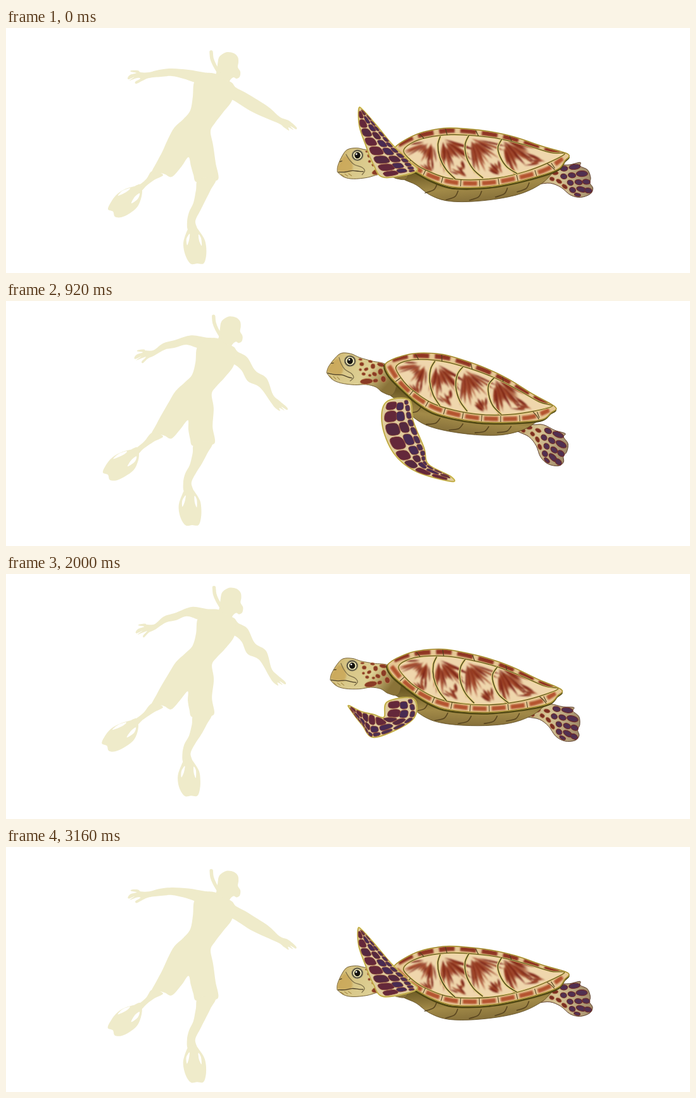
An HTML page for the animation above (3200 ms loop, 1080 px wide and 387 px high).

```html
<!DOCTYPE html>
<html lang="en">
<head>
<meta charset="utf-8">
<title>Diver and turtle</title>
<style>
html, body { margin: 0; width: 100%; height: 100%; overflow: hidden; background: #fff; }
svg { display: block; width: 100vw; height: 100vh; }
</style>
</head>
<body>
<svg id="stage" viewBox="0 0 1080 387">
  <defs>
    <filter id="soft" x="-10%" y="-10%" width="120%" height="120%"><feGaussianBlur stdDeviation="1"/></filter>
    <linearGradient id="belly" x1="0" y1="0" x2="0" y2="1">
      <stop offset="0.35" stop-color="#6f5c26"/><stop offset="0.72" stop-color="#a28a48"/><stop offset="1" stop-color="#86703a"/>
    </linearGradient>
    <linearGradient id="head" x1="0" y1="0" x2="1" y2="0.35">
      <stop offset="0" stop-color="#c5a557"/><stop offset="0.22" stop-color="#d6c382"/>
      <stop offset="0.65" stop-color="#ddcf94"/><stop offset="1" stop-color="#8a7338"/>
    </linearGradient>
    <linearGradient id="hind" x1="0" y1="0" x2="1" y2="0">
      <stop offset="0" stop-color="#a9905a"/><stop offset="0.5" stop-color="#d8c596"/><stop offset="1" stop-color="#a08a68"/>
    </linearGradient>
    <clipPath id="plates"><path id="platesPath"/></clipPath>
    <clipPath id="shellClip"><path id="shellPath"/></clipPath>
  </defs>
  <g id="diver"></g>
  <g id="turtle"><g id="rear"></g><g id="body"></g></g>
  <g id="flipper"></g>
</svg>
<script>
const LOOP = 3200, STEP = 40;
const $ = id => document.getElementById(id);
const pts = s => s.trim().split(/\s+/).map(p => p.split(',').map(Number));
const mix = (a, b, k) => a + (b - a) * k;
const n1 = v => v.toFixed(1);

function add(parent, tag, attrs) {
  const el = document.createElementNS('http://www.w3.org/2000/svg', tag);
  for (const k in attrs) el.setAttribute(k, attrs[k]);
  return parent.appendChild(el);
}

// Smooth curve through points.
function curve(p, closed) {
  const n = p.length;
  const at = i => closed ? p[(i + n) % n] : p[Math.max(0, Math.min(n - 1, i))];
  let d = 'M' + p[0].map(n1);
  for (let i = 0; i < (closed ? n : n - 1); i++) {
    const [a, b, c, e] = [at(i - 1), at(i), at(i + 1), at(i + 2)];
    const c1 = [0, 1].map(k => n1(b[k] + (c[k] - a[k]) / 6));
    const c2 = [0, 1].map(k => n1(c[k] - (e[k] - b[k]) / 6));
    d += `C${c1} ${c2} ${c.map(n1)}`;
  }
  return d + (closed ? 'Z' : '');
}

let seed = 11;
const rnd = () => (seed = seed * 16807 % 2147483647) / 2147483647;

/* ---------- diver ---------- */
const SKIN = '#efebca';
const diverParts = [
  // head and neck
  ['334,58 336,47 342,41 350,38 360,40 366,46 367,54 366,62 370,69 369,77 364,80 359,78 353,84 350,98 332,98 326,82 332,71'],
  // far arm
  ['332,74 312,70 288,66 262,64 242,66 226,70 213,70 208,67 198,67 197,69 206,71 196,74 192,79 194,81 203,77 195,83 207,79 212,80 204,85 206,88 216,83 226,79 245,77 262,76 280,80 298,86 315,92'],
  // near arm
  ['344,84 356,86 363,94 378,102 398,114 416,126 433,141 446,146 458,156 458,160 449,155 454,161 446,157 447,162 439,157 431,151 405,140 386,131 370,121 356,113 340,110'],
  // trunk and shorts
  ['326,72 345,82 358,92 357,114 343,133 330,150 323,163 327,185 331,213 335,239 316,241 300,243 296,232 292,218 288,204 277,219 262,235 251,231 243,229 229,231 238,212 247,195 256,175 266,157 280,144 291,130 295,108 297,86 308,76'],
  // lower legs
  ['231,226 222,238 213,246 204,250 205,260 214,257 222,249 234,240 248,232'],
  ['304,239 300,256 296,276 289,291 286,306 288,320 302,320 299,305 307,288 315,272 323,256 331,238'],
  // fins
  ['212,247 203,250 189,254 176,262 167,273 161,286 169,290 172,298 182,299 195,293 207,283 213,270 215,257'],
  ['289,316 284,325 280,340 282,355 287,367 293,373 302,372 312,372 316,360 316,345 313,333 306,322 299,314'],
  // foot openings
  ['177,265 184,257 196,253 190,259', '#fff'], ['198,277 203,267 211,261 208,270', '#fff'],
  ['286,343 285,333 290,325 289,335', '#fff'], ['304,326 308,332 309,344 305,336', '#fff']
].map(([s, fill = SKIN]) => ({ p: pts(s), el: add($('diver'), 'path', { fill }) }));
const snorkel = {
  p: pts('324,38 325,48 329,58 336,70'),
  el: add($('diver'), 'path', { fill: 'none', stroke: SKIN, 'stroke-width': 5.5, 'stroke-linecap': 'round' })
};

// Warp handles: x, y and how far each one travels.
const handles = [
  [350, 60, 6, -22], [325, 40, 6, -22], [328, 100, 7, -22], [290, 75, 7, -19],
  [258, 70, 9, -4], [224, 75, 12, 12], [198, 77, 17, 17], [362, 100, 5, -22],
  [402, 127, -7, -6], [454, 157, -23, 19], [300, 165, 3, -26], [240, 226, 0, -29],
  [210, 250, -8, -25], [166, 286, -13, -25], [316, 240, -9, -23], [292, 308, -10, -29], [297, 368, -13, -29]
];
function warp([x, y], k) {
  let sw = 0, sx = 0, sy = 0;
  for (const [hx, hy, dx, dy] of handles) {
    const w = 1 / ((x - hx) ** 2 + (y - hy) ** 2 + 60) ** 2;
    sw += w; sx += w * dx; sy += w * dy;
  }
  return [x + sx / sw * k, y + sy / sw * k];
}
function drawDiver(t) {
  const s = (t + LOOP - 200) % LOOP;
  const u = s < 1200 ? s / 1200 : 1 - (s - 1200) / 2000;
  const k = (u - 0.1) / 0.8;
  for (const { p, el } of diverParts) el.setAttribute('d', curve(p.map(q => warp(q, k)), true));
  snorkel.el.setAttribute('d', curve(snorkel.p.map(q => warp(q, k)), false));
}

/* ---------- turtle ---------- */
const body = $('body'), rear = $('rear');
const shape = (g, s, attrs) => add(g, 'path', { d: curve(pts(s), true), ...attrs });
const line = (g, s, stroke, width, attrs) =>
  add(g, 'path', { d: curve(pts(s), false), fill: 'none', stroke, 'stroke-width': width, ...attrs });
const oval = (g, cx, cy, rx, ry, turn, fill, attrs) =>
  add(g, 'ellipse', { cx, cy, rx, ry, fill, transform: `rotate(${turn} ${cx} ${cy})`, ...attrs });

// rear flipper
shape(rear, '806,224 822,217 845,213 862,208 882,211 899,211 898,217 908,225 910,238 907,246 910,255 904,263 888,265 873,258 861,243 846,233 826,230',
  { fill: 'url(#hind)', stroke: '#5a3b2a', 'stroke-width': 0.9 });
for (const [x, y, a, b, r] of [[822, 223, 5, 3, 0], [834, 226, 4, 3, 20], [842, 219, 5, 3, -15], [850, 227, 4, 3, 30], [857, 219, 5, 3, 10], [860, 233, 5, 3, 45], [867, 243, 5, 3, 50]])
  oval(rear, x, y, a, b, r, '#7c2f22', { stroke: '#b07048', 'stroke-width': 0.8 });
for (const [x, y, a, b, r] of [[872, 215, 6, 4, 10], [889, 216, 9, 4, 5], [869, 227, 5, 4, 25], [882, 228, 6, 4, 20], [898, 229, 9, 4.5, 12], [877, 239, 5, 4, 35], [890, 241, 6, 4, 22], [902, 243, 6, 4, 20], [878, 251, 5, 4, 40], [892, 253, 8, 4, 28], [884, 260, 5, 2.5, 25], [902, 257, 6, 4, 25]])
  oval(rear, x, y, a, b, r, '#513050', { stroke: '#6e2c2c', 'stroke-width': 1.2 });

// belly
shape(body, '590,180 610,165 700,190 800,205 856,205 848,217 830,230 800,241 760,246 715,246 680,241 655,229 636,212 615,200',
  { fill: 'url(#belly)', stroke: '#5d4a20', 'stroke-width': 0.8 });
for (const [x, y] of [[655, 222], [687, 236], [724, 240], [765, 239], [800, 234]])
  line(body, `${x + 14},${y - 9} ${x + 8},${y} ${x - 7},${y + 4}`, '#4a3716', 1.6, { opacity: 0.8 });

// head and neck
shape(body, '514,178 516,169 524,155 533,146 548,145 562,149 582,152 606,155 625,175 622,200 606,199 594,192 578,190 560,193 538,193 524,189 515,181',
  { fill: 'url(#head)', stroke: '#6e5a30', 'stroke-width': 0.9 });
shape(body, '515,177 518,168 527,156 535,160 539,172 535,181 524,181', { fill: '#c79f4b', opacity: 0.65, filter: 'url(#soft)' });
const spot = (x, y, a, b, r) => oval(body, x, y, a, b, r, '#8a3b25', { stroke: '#bf8a55', 'stroke-width': 0.8 });
for (const s of [[578, 185, 10, 4.5, -12], [567, 159, 3.5, 3, 0], [575, 166, 3.5, 2.5, -30], [585, 160, 3.5, 4, 0], [589, 172, 4, 3, 20], [572, 174, 3, 2.4, 0], [598, 167, 4, 5, 0], [597, 156, 6, 3, 8], [566, 168, 2.2, 2, 0], [592, 182, 4, 3, -20], [604, 178, 4, 5, -20], [580, 153, 3.5, 2, 5], [564, 152, 3, 1.6, 0], [582, 175, 2.5, 2, 0]]) spot(...s);
line(body, '515,180 526,181 538,180 548,182 555,183', '#4d4028', 1.3);
line(body, '530,153 535,163 542,171 553,176 557,182 552,188', '#7d6f48', 1.3);
line(body, '519,164 523,163', '#4d4028', 1.4);
for (const x of [519, 525, 531]) line(body, `${x},184 ${x + 5},188`, '#a3853f', 1);
oval(body, 548, 156.5, 9.5, 9, 0, '#8b8463');
oval(body, 548, 156.5, 7.6, 7.2, 0, '#ece5b4', { stroke: '#38332a', 'stroke-width': 1.1 });
oval(body, 548, 156.5, 4.6, 5, 0, '#15130f');
oval(body, 546.5, 154.5, 1.4, 1.4, 0, '#fff');

// shell
const shell = '604,156 610,148 624,140 645,132 668,128 692,127 722,131 760,139 800,152 840,170 879,186 873,196 863,207 840,214 800,221 760,225 720,224 688,219 660,206 634,188 613,171';
const plates = '621,157 633,146 660,139 698,138 735,143 775,152 815,166 852,181 874,185 846,197 810,207 766,213 722,212 684,205 650,188 632,173';
$('shellPath').setAttribute('d', curve(pts(shell), true));
$('platesPath').setAttribute('d', curve(pts(plates), true));
shape(body, shell, { fill: 'none', stroke: '#4e4612', 'stroke-width': 3, transform: 'translate(-1 2)' });
shape(body, shell, { fill: '#e6c795' });

const tops = add(body, 'g', { 'clip-path': 'url(#shellClip)' });
const soft = add(tops, 'g', { filter: 'url(#soft)' });
line(soft, '614,146 640,136 670,132 700,131 740,138 790,152 840,173 866,184', '#8f3424', 8, { 'stroke-dasharray': '25 9' });
const rim = '610,156 630,179 655,197 690,212 725,218 765,219 810,214 845,206 870,192';
line(soft, rim, '#b4522f', 7, { 'stroke-dasharray': '22 8' });
shape(body, plates, { fill: '#efd6ac' });

// Streaks fan out from the top corner of each plate.
const fans = add(add(body, 'g', { 'clip-path': 'url(#plates)' }), 'g', { filter: 'url(#soft)' });
function fan(x, y, from, to, len, count) {
  for (let i = 0; i < count; i++) {
    const a = mix(from, to, (i + rnd() * 0.8) / count) * Math.PI / 180;
    const r0 = 3 + rnd() * 13, r1 = len * (0.55 + rnd() * 0.45), w = 2 + rnd() * 2.4;
    const at = (r, o) => [x + r * Math.cos(a) - o * Math.sin(a), y + r * Math.sin(a) + o * Math.cos(a)].map(n1);
    const m = mix(r0, r1, 0.45);
    add(fans, 'path', {
      d: `M${at(r0, 0)}Q${at(m, w)} ${at(r1, 0)}Q${at(m, -w)} ${at(r0, 0)}Z`,
      fill: ['#7c2418', '#94391f', '#a64e30'][i % 3]
    });
  }
}
fan(668, 145, 85, 178, 50, 13);
fan(684, 143, 22, 100, 60, 15);
fan(727, 146, 18, 92, 64, 16);
fan(778, 153, 12, 85, 70, 17);
fan(664, 198, 195, 275, 34, 7);
fan(718, 209, 205, 262, 36, 7);
fan(774, 211, 205, 262, 36, 7);
fan(846, 196, 175, 212, 40, 7);

shape(body, plates, { fill: 'none', stroke: '#dcc76a', 'stroke-width': 2.6 });
shape(body, plates, { fill: 'none', stroke: '#4f401c', 'stroke-width': 1 });
for (const s of ['681,139 676,152 677,172 685,192 698,208', '726,142 719,155 719,175 728,196 742,211', '777,153 770,165 772,180 781,197 796,209']) {
  line(body, s, '#e0cd78', 4);
  line(body, s, '#3f3516', 1.3);
}
for (const s of ['690,127 692,138', '737,134 741,144', '648,131 655,140', '790,148 792,157'])
  line(body, s, '#4f401c', 1.2);
line(body, rim, '#4f401c', 10, { 'stroke-dasharray': '1.1 28.9', 'stroke-dashoffset': -25.5 });
line(body, '845,198 852,204 856,209', '#4f401c', 1.1);
shape(body, shell, { fill: 'none', stroke: '#d9c74f', 'stroke-width': 1.8 });
shape(body, shell, { fill: 'none', stroke: '#5b3a1e', 'stroke-width': 0.6 });

function drawTurtle(t) {
  const v = t < 880 ? t / 880 : 1 - (t - 880) / 2320;
  const k = v - 0.41;
  const x = 878 - 20.5 * k, y = 187 - 32.5 * k;
  $('turtle').setAttribute('transform', `translate(${n1(x)} ${n1(y)}) rotate(${(13.2 * k).toFixed(2)}) translate(-878 -187)`);
  rear.setAttribute('transform', `rotate(${(17 * k).toFixed(2)} 815 223)`);
}

/* ---------- front flipper ---------- */
// Each pose: leading edge from root to tip, then trailing edge.
const poses = [
  [0, '597,236 580,215 568,185 558,155 557,128', '648,226 636,210 609,183 586,155 563,129'],
  [360, '601,206 600,222 596,228 588,222 583,211', '646,202 649,232 640,257 592,267 586,214'],
  [920, '600,160 594,195 612,240 647,269 703,285', '636,156 643,190 660,232 667,258 702,277'],
  [1600, '602,184 598,220 612,271 632,303 665,327', '642,182 649,215 651,262 655,295 668,320'],
  [2000, '602,202 597,226 581,222 560,217 542,208', '643,197 642,230 583,258 562,238 543,213'],
  [2720, '590,239 574,219 560,195 546,170 543,151', '648,218 620,207 595,188 568,168 548,152']
].map(([t, a, b]) => ({ t, a: pts(a), b: pts(b) }));
poses.push({ ...poses[0], t: LOOP });

const flipper = $('flipper');
const fin = add(flipper, 'path', { fill: '#dfcb9e', stroke: '#e2d25c', 'stroke-width': 2.2, 'stroke-linejoin': 'round' });
const finLine = add(flipper, 'path', { fill: 'none', stroke: '#6b4a2c', 'stroke-width': 0.5 });
const cells = [];
[[0.27, 0.21, 8, '#64283a'], [0.64, 0.14, 9, '#482b52'], [0.89, 0.08, 13, '#4d3050']].forEach(([w, rw, rows, fill], c) => {
  for (let i = 0; i < rows; i++) {
    const s = (i + (c === 1 ? 0.75 : 0.5)) / (rows + 0.3);
    cells.push({
      s, w: w + (rnd() - 0.5) * 0.05, rs: 0.43 / rows, rw,
      el: add(flipper, 'path', { fill: i % 3 === 2 && c < 2 ? '#55293f' : fill, stroke: '#8b4636', 'stroke-width': 0.9 })
    });
  }
});

function edgeAt(e, s) {
  const f = Math.max(0, Math.min(3.999, s * 4)), i = Math.floor(f), k = f - i;
  const at = j => e[Math.max(0, Math.min(4, j))];
  const [a, b, c, d] = [at(i - 1), at(i), at(i + 1), at(i + 2)];
  return [0, 1].map(q => b[q] + 0.5 * k * (c[q] - a[q] + k * (2 * a[q] - 5 * b[q] + 4 * c[q] - d[q] + k * (3 * (b[q] - c[q]) + d[q] - a[q]))));
}
function drawFlipper(t) {
  let i = 0;
  while (t >= poses[i + 1].t) i++;
  const p = poses[i], q = poses[i + 1], k = (t - p.t) / (q.t - p.t);
  const blend = key => p[key].map((v, j) => [mix(v[0], q[key][j][0], k), mix(v[1], q[key][j][1], k)]);
  const a = blend('a'), b = blend('b');
  const d = curve([...a, ...b.slice().reverse()], true);
  fin.setAttribute('d', d);
  finLine.setAttribute('d', d);
  for (const { s, w, rs, rw, el } of cells) {
    const ring = [];
    for (let j = 0; j < 8; j++) {
      const ang = j * Math.PI / 4 + 0.4, c = Math.cos(ang), n = Math.sin(ang);
      const ss = s + rs * Math.sign(c) * Math.abs(c) ** 0.7, ww = w + rw * Math.sign(n) * Math.abs(n) ** 0.7;
      const u = edgeAt(a, ss), v = edgeAt(b, ss);
      ring.push([mix(u[0], v[0], ww), mix(u[1], v[1], ww)]);
    }
    el.setAttribute('d', curve(ring, true));
  }
}

function draw(now) {
  const t = Math.floor(now % LOOP / STEP) * STEP;
  drawDiver(t);
  drawTurtle(t);
  drawFlipper(t);
}
function tick() {
  draw(performance.now());
  requestAnimationFrame(tick);
}
tick();
</script>
</body>
</html>
```
